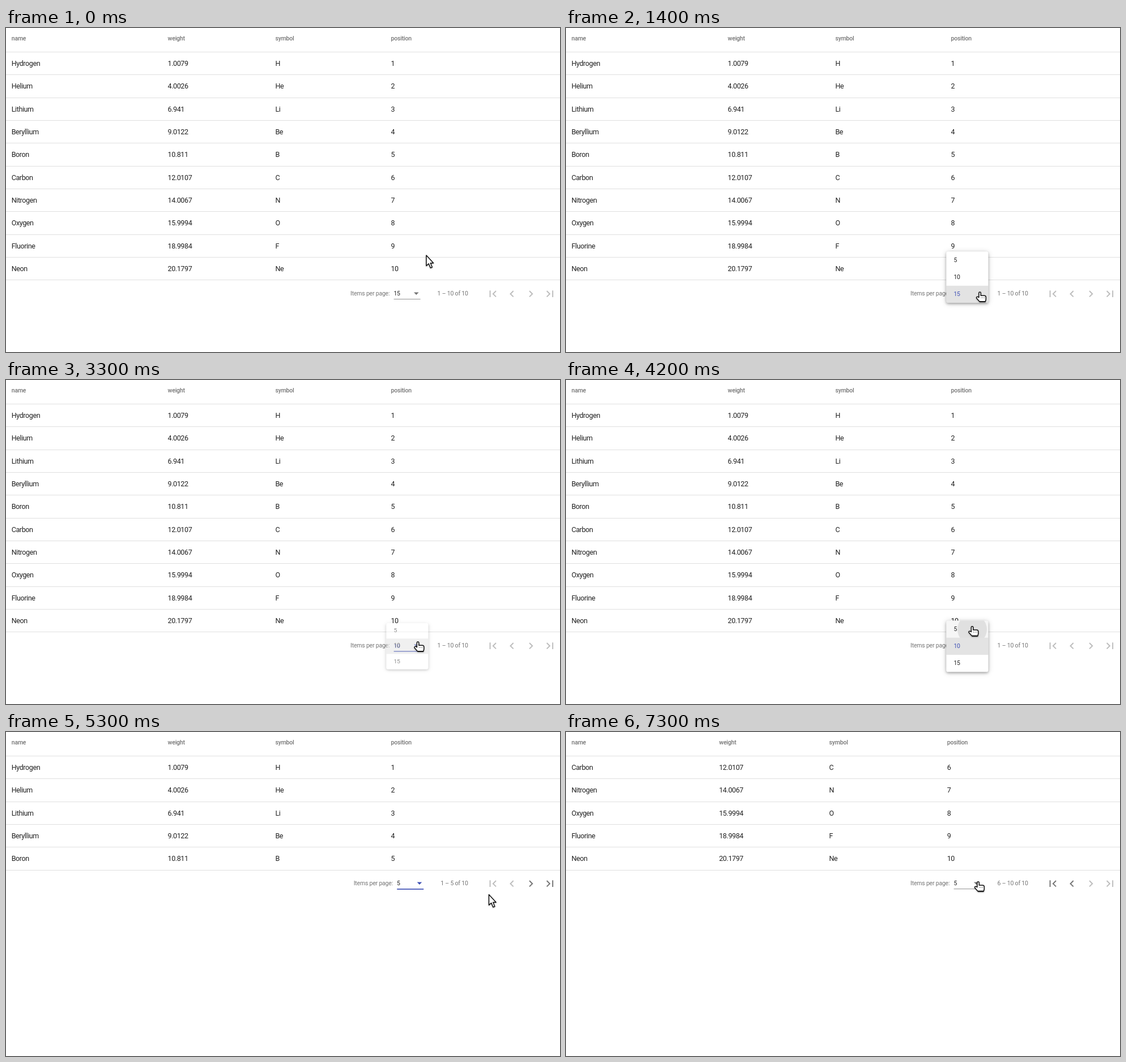
Recreate the animation shown at these times as an HTML page. Size 978 by 573 pixels, loop 8 s.

```html
<!DOCTYPE html>
<html lang="en">
<head>
<meta charset="utf-8">
<title>Paginated table</title>
<style>
html, body { margin: 0; width: 978px; height: 573px; overflow: hidden; background: #fff; }
svg { display: block; font: 10.5px Roboto, sans-serif; letter-spacing: -.2px; fill: #212121; }
.cell { font-size: 12.5px; letter-spacing: -.38px; }
.head { font-weight: 500; fill: #757575; }
.muted { fill: #757575; }
.tip { font-size: 8.4px; letter-spacing: 0; text-anchor: middle; fill: #fff; }
.card { fill: #fff; filter: drop-shadow(0 2px 2px rgba(0,0,0,.26)) drop-shadow(0 1.5px 4px rgba(0,0,0,.2)); }
.cursor { fill: #fff; stroke: #111; stroke-linejoin: round; filter: drop-shadow(.6px 1.2px .8px rgba(0,0,0,.3)); }
</style>
</head>
<body>
<svg id="stage" width="978" height="573" viewBox="0 0 978 573"></svg>
<script>
const LOOP = 8000, STEP = 100, ROW = 40.32, OPTION = 30.24, DIGIT = 5.66;
const BLUE = '#3f51b5', GREY = '#757575', PALE = '#bdbdbd';
const names = 'Hydrogen Helium Lithium Beryllium Boron Carbon Nitrogen Oxygen Fluorine Neon'.split(' ');
const weights = '1.0079 4.0026 6.941 9.0122 10.811 12.0107 14.0067 15.9994 18.9984 20.1797'.split(' ');
const symbols = 'H He Li Be B C N O F Ne'.split(' ');
const sizes = ['5', '10', '15'];
const stage = document.getElementById('stage');

function set(el, attrs) {
  for (const k in attrs) el.setAttribute(k, attrs[k]);
  return el;
}
function add(parent, tag, attrs = {}) {
  return parent.appendChild(set(document.createElementNS('http://www.w3.org/2000/svg', tag), attrs));
}
function label(parent, x, y, text, cls = '') {
  const el = add(parent, 'text', { x, y, class: cls });
  el.textContent = text;
  return el;
}
const show = (el, on) => el.setAttribute('display', on ? 'inline' : 'none');
const clamp = v => Math.max(0, Math.min(1, v));
const ease = u => u * u * (3 - 2 * u);
const progress = (t, from, to) => clamp((t - from) / (to - from));

// Table
const heads = ['name', 'weight', 'symbol', 'position'].map(s => label(stage, 0, 22, s, 'head'));
const rule = k => add(stage, 'rect', { y: Math.floor(42.5 + ROW * k), width: 978, height: 1, fill: '#e0e0e0' });
rule(0);
const rows = names.map((_, k) => ({
  cells: heads.map(() => label(stage, 0, Math.round(62 + ROW * k) + 5, '', 'cell')),
  rule: rule(k + 1)
}));

// Paginator
const pager = add(stage, 'g');
const picker = add(pager, 'g');
label(picker, 608, 473, 'Items per page:', 'muted');
const value = label(picker, 684.4, 473, '');
const caret = add(picker, 'path', { d: 'M720 467.6h8.6l-4.3 4.4z' });
const underline = add(picker, 'rect', { x: 684.6, y: 479, width: 47 });
const range = label(pager, 0, 473, '', 'muted');
const ripple = add(pager, 'circle', { cx: 926.7, cy: 470 });
const icons = [
  'M18.41 16.59L13.82 12l4.59-4.59L17 6l-6 6 6 6zM6 6h2v12H6z',
  'M15.41 7.41L14 6l-6 6 6 6 1.41-1.41L10.83 12z',
  'M10 6L8.59 7.41 13.17 12l-4.58 4.59L10 18l6-6z',
  'M5.59 7.41L10.18 12l-4.59 4.59L7 18l6-6-6-6zM16 6h2v12h-2z'
].map((d, i) => add(pager, 'path', { d, transform: `translate(${847.7 + 33.6 * i} 458.4) scale(.98)` }));

// Dropdown: opens, is pressed at (x, y), closes
const menus = [
  { open: 1000, down: 2100, selected: 2, choice: 1, x: 705, y: 440, r: 12 },
  { open: 3300, down: 4200, selected: 1, choice: 0, x: 717, y: 441, r: 26 }
];
const panel = add(stage, 'g');
const box = { x: 671.3, y: 0, width: 74.2, height: OPTION * 3, rx: 3.4 };
add(panel, 'rect', { ...box, class: 'card' });
const defs = add(stage, 'defs');
add(add(defs, 'clipPath', { id: 'round' }), 'rect', box);
const optionBox = { ...box, height: OPTION, rx: 0 };
const optionClip = add(add(defs, 'clipPath', { id: 'option' }), 'rect', optionBox);
const inner = add(panel, 'g', { 'clip-path': 'url(#round)' });
const options = sizes.map((s, i) => ({
  back: add(inner, 'rect', { ...optionBox, y: OPTION * i }),
  text: label(panel, 684.4, OPTION * (i + .5) + 3.1, s)
}));
const splash = add(add(inner, 'g', { 'clip-path': 'url(#option)' }), 'circle', { 'fill-opacity': .1 });

// Tooltip
const tip = add(stage, 'g');
add(tip, 'rect', { x: -26, y: -27, width: 52, height: 27, rx: 3.4, fill: '#616161', 'fill-opacity': .9 });
label(tip, 0, -10.6, 'Next page', 'tip');

// Cursors, drawn with the hot spot at the origin
const arrow = add(stage, 'path', {
  class: 'cursor', 'stroke-width': 1.5,
  d: 'M0 0V18.6L4.2 14.8L7.4 22.3L10.4 21L7.3 13.7H12.6Z'
});
const hand = add(stage, 'g', { class: 'cursor', 'stroke-width': 1.5 });
add(hand, 'path', {
  d: 'M-1.6 9.6V1.7a1.7 1.7 0 0 1 3.4 0V6.2H8Q10.8 6.4 10.8 9V13L9.8 16.8H-.5L-5.6 11Q-6.6 9-4.8 8.4Q-3.4 8.2-1.6 9.6Z'
});
add(hand, 'path', { d: 'M-.3 17H9.8', 'stroke-width': 2 });
add(hand, 'path', { d: 'M2 10h1M4.7 10h1M7.4 10h1', 'stroke-width': 1 });

// Pointer glides: from, to, x, y, is a hand
const glides = [
  [0, 250, 755, 473, false], [250, 400, 740, 471, false], [500, 800, 730.5, 467, true],
  [1400, 1900, 707, 437, true], [2150, 2400, 717, 457, false], [2700, 2800, 727, 463, true],
  [3800, 4100, 717, 435.8, true], [4250, 4700, 734, 473, false], [4700, 5300, 852.5, 287.5, false],
  [5300, 5600, 966, 265.5, true], [5600, 5900, 937, 265, true], [6500, 7200, 734, 265.5, false],
  [7200, 7300, 727.5, 264.8, true]
];

function pointer(t) {
  let x = 742, y = 402, isHand = false;
  for (const [from, to, nx, ny, kind] of glides) {
    if (t <= from) break;
    const u = ease(progress(t, from, to));
    x += (nx - x) * u;
    y += (ny - y) * u;
    isHand = kind;
  }
  return { x, y, isHand };
}

function drawTable(start, count) {
  const xs = start ? [10, 270.5, 464.8, 673] : [10, 285.8, 475.7, 679.7];
  heads.forEach((h, i) => set(h, { x: xs[i] - .2 }));
  rows.forEach((row, k) => {
    const on = k < count, n = start + k;
    const texts = [names[n], weights[n], symbols[n], n + 1];
    show(row.rule, on);
    row.cells.forEach((cell, i) => {
      show(cell, on);
      set(cell, { x: xs[i] - .3 });
      cell.textContent = on ? texts[i] : '';
    });
  });
}

function drawPager(t, start, count) {
  const end = start + count, shift = end < 10 ? DIGIT : 0;
  const focused = t >= 1000 && t < 6400;
  set(pager, { transform: `translate(0 ${count < 10 ? -202 : 0})` });
  set(picker, { transform: `translate(${shift} 0)` });
  value.textContent = t < 2200 ? '15' : t < 4300 ? '10' : '5';
  set(caret, { fill: focused ? BLUE : GREY });
  set(underline, { height: focused ? 1.7 : 1, fill: focused ? BLUE : '#949494' });
  set(range, { x: 761.6 + shift });
  range.textContent = `${start + 1} – ${end} of 10`;
  icons.forEach((icon, i) => set(icon, { fill: (i < 2 ? start > 0 : end < 10) ? GREY : PALE }));
  show(ripple, t >= 6400);
  set(ripple, {
    r: 12.5 + 4.3 * progress(t, 6400, 6500),
    'fill-opacity': .07 * (1 - progress(t, 6500, 6900))
  });
}

function drawMenu(t, y) {
  const m = menus.find(m => t >= m.open && t < m.down + 200);
  show(panel, m);
  if (!m) return;
  const top = 455.8 - OPTION * m.selected;
  const closing = t >= m.down + 100;
  const grow = progress(t, m.open - 60, m.open + 60);
  const sy = .8 + .2 * grow;
  set(panel, {
    opacity: closing ? .76 : grow,
    transform: `translate(0 ${top + OPTION * 1.5 * (1 - sy)}) scale(1 ${sy})`
  });
  const selected = closing ? m.choice : m.selected;
  const hover = Math.floor((y - top) / OPTION);
  options.forEach((o, i) => {
    set(o.back, { 'fill-opacity': i === selected ? .125 : i === hover ? .04 : 0 });
    set(o.text, { fill: i === selected ? BLUE : '#212121' });
  });
  const held = t - m.down;
  show(splash, held >= 0);
  set(splash, { cx: m.x, cy: m.y - top, r: Math.max(0, m.r + held * .2) });
  set(optionClip, { y: OPTION * m.choice });
}

function drawTip(t) {
  const pop = t < 6500 ? progress(t, 5540, 5800) : 1 - progress(t, 6440, 6540);
  show(tip, pop > 0);
  set(tip, { transform: `translate(926.7 239.3) scale(${pop})`, opacity: pop });
}

function draw(time) {
  const t = Math.floor(time / STEP) * STEP;
  const { x, y, isHand } = pointer(t);
  const start = t < 6500 ? 0 : 5, count = t < 4300 ? 10 : 5;
  drawTable(start, count);
  drawPager(t, start, count);
  drawMenu(t, y);
  drawTip(t);
  show(arrow, !isHand);
  show(hand, isHand);
  set(isHand ? hand : arrow, { transform: `translate(${x} ${y})` });
}

const began = performance.now();
function tick() {
  draw((performance.now() - began) % LOOP);
  requestAnimationFrame(tick);
}
tick();
</script>
</body>
</html>
```
